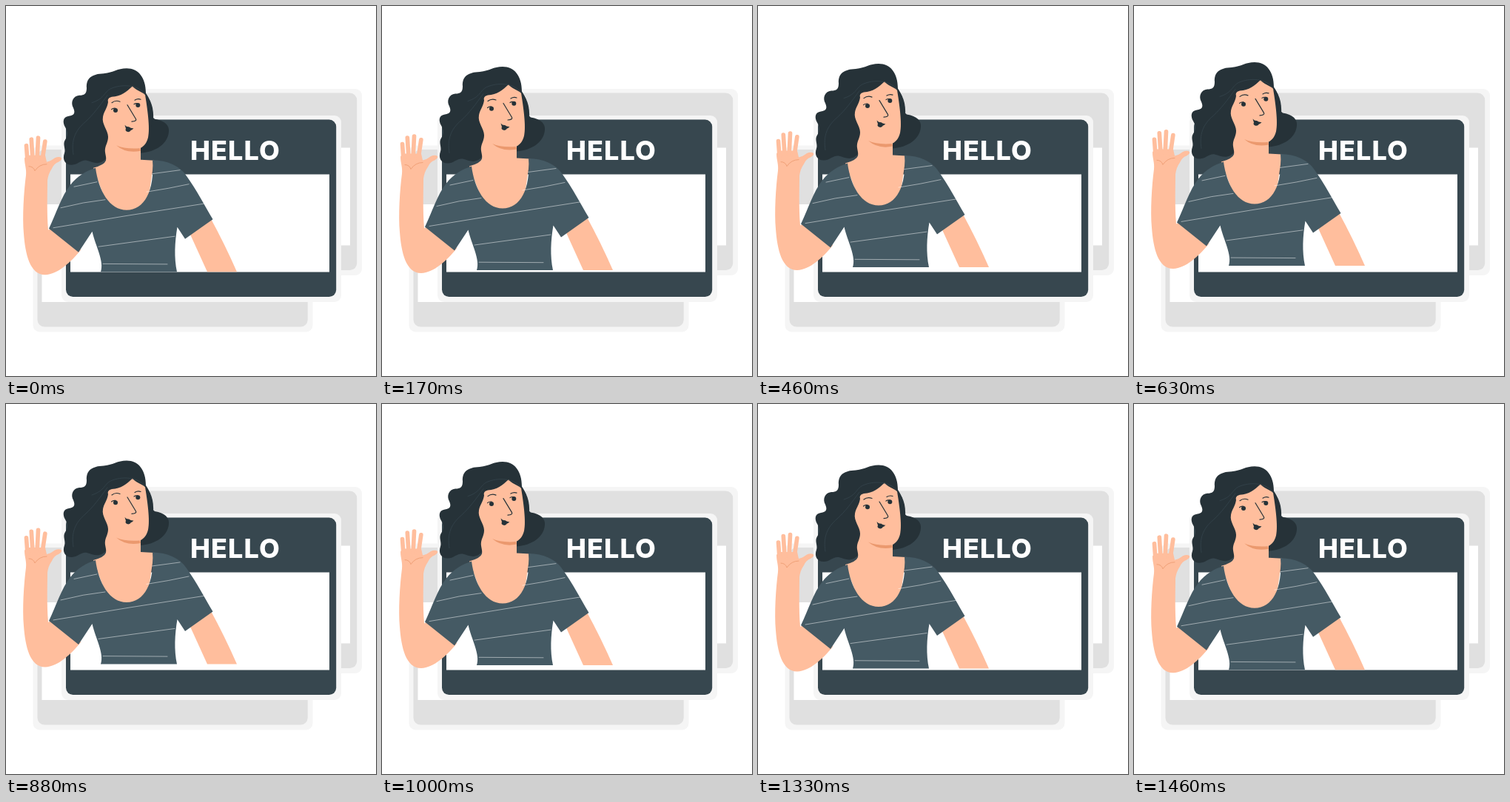
An HTML page that plays this animation: 500 by 500 pixels, repeating every 1500 ms.

```html
<!DOCTYPE html>
<html lang="en">
<head>
<meta charset="utf-8">
<title>Hello</title>
<style>
  html, body { margin: 0; width: 100%; height: 100%; overflow: hidden; background: #fff; }
  svg { display: block; width: 100%; height: 100%; }
  .line { fill: none; stroke-linecap: round; stroke-linejoin: round; }
  .hair { fill: #263238; }
  .skin { fill: #ffbe9d; }
  .fingers { stroke: #ffbe9d; stroke-width: 5.7; }
  .crease { stroke: #eb996e; stroke-width: .8; }
  .strand { stroke: #37474f; stroke-width: .7; }
  .stripe { stroke: #fff; stroke-width: .7; opacity: .7; }
  .ink { stroke: #263238; stroke-width: 1.2; }
  .title { font: 800 36px Inter, Roboto, sans-serif; letter-spacing: 1.1px; fill: #fff; }
</style>
</head>
<body>
<svg viewBox="0 0 500 500">
  <defs>
    <g id="card">
      <rect width="378" height="252" rx="9" fill="#f5f5f5"/>
      <rect x="6" y="5.6" width="365.200" height="239.400" rx="9.500" fill="currentColor"/>
      <rect x="12" y="79.500" width="350" height="132" fill="#fff"/>
    </g>
  </defs>
  <g color="#e0e0e0">
    <use href="#card" x="103" y="112"/>
    <use href="#card" x="36.5" y="188.5"/>
  </g>
  <use href="#card" x="75" y="148" color="#37474f"/>
  <text class="title" x="249" y="207.800">HELLO</text>

  <g id="woman">
    <!-- raised arm and hand -->
    <path class="skin" d="M25 206C25 215 28 220 27 229C24 252 22 285 24 308C26 335 32 363.500 53 363.500C70 363 88 346 101 330L80 290L57 303C55 278 56 252 56 236Q57 227 62 220Q65 213 71 211Q76 208 75 205.500Q72 203 66 205.500Q60 210 55 211L53 202H28Z"/>
    <path class="line fingers" d="M27.500 189L29 210M34.300 180.500L36 208M43.500 178.500L42 208M52.800 183.300L49 209"/>
    <path class="line crease" d="M31 217Q37 217 39 223Q45 214 55 214"/>

    <!-- back hair and far arm -->
    <path class="hair" d="M186 145Q199 150 201 153C215 155 221 162 220 170C219 185 204 198 180 199Z"/>
    <path class="skin" d="M249 309L272 359.500H312Q296 323 277 288Z"/>

    <!-- hair -->
    <path class="hair" d="M189 118C189 97 179 84.500 163 84.500C150 84.500 146 90 132 91.500C116 92 108 98 109 111C109 119 106 121 99 121C90 122 87 131 91 138C94 145 92 148 85 149C77 150 76 157 80 164C84 171 84 175 80 181C76 187 81 193 79 199C76 207 79 215 89 215C97 215 101 208 109 209C117 211 123 215 131 210L150 195L175 150L196 150C200 140 194 125 189 118Z"/>
    <path class="hair" d="M186 116C196 126 200 138 199 155L190 180Z"/>

    <!-- face, neck and chest -->
    <path class="skin" d="M171 108.500C175 114 183 116 188 120C191 139 195 165 192 178C190 186 186 190 182 192V208L200 209L190 278H140L118 219Q133 215 135 209C136 203 133 199 134 193C135 187 138 184 138 177C138 168 129 160 131 150C132 143 137 138 138 130C137 126 139 124 143 123C156 122 162 117 171 108.500Z"/>
    <path d="M149 188.500Q161 194 181 192.500L182 196Q162 200 149 188.500Z" fill="#eb996e"/>
    <path class="line strand" d="M188 120C181 108 160 105 144 111C132 115 135 125 116 131M137 121C126 136 118 147 107 157C93 169 88 182 91 201"/>

    <path class="line ink" d="M143 131Q148 127 154 129.500M174 127.500Q178 125 182 126.500M164 134L175.500 153Q177 156 170 156.500M142.500 140Q145 138 148 138.500M173 133Q175 131.500 178 132"/>
    <g class="hair">
      <circle cx="148" cy="141.300" r="3"/>
      <circle cx="178.300" cy="134.300" r="3"/>
      <path d="M160.500 161Q163 164 166 163.500Q169 166 172.500 165.500Q170 168 169 168Q167 171.500 163.500 170Q160.500 168.500 162 166Z"/>
    </g>

    <!-- shirt -->
    <path fill="#455a64" d="M198 208.500C218 209 235 216 244 230C257 248 268 269 279.500 288.500L242 315L231.500 299C228 320 227 340 231 359.500H128C133 345 121 325 116.500 305L98 333L58 301C68 280 75 257 87 242C96 230 109 223 121 219C125 250 140 276 163 276C187 276 201 250 198 208.500Z"/>
    <path class="line stripe" d="M197.500 227L235 222M92 244.500L123 238M74 273Q105 265 134 262M190 251.500Q220 247 247 241M64 300Q165 283 270 267M125 325.500L228 311.500M131 348.700L218 349.200"/>
  </g>
</svg>
<script>
  const LOOP = 1500, STEPS = 36, RISE = 10;
  const woman = document.getElementById('woman');

  // Constant speed up and down, held on 24 steps a second.
  function draw() {
    const time = performance.now() % LOOP;
    const step = Math.floor((time + 3.4) * STEPS / LOOP) % STEPS;
    const phase = (step + 0.5) / STEPS;
    const lift = RISE * (1 - Math.abs(1 - 2 * phase));
    woman.setAttribute('transform', `translate(0 ${-lift})`);
    requestAnimationFrame(draw);
  }
  draw();
</script>
</body>
</html>
```
